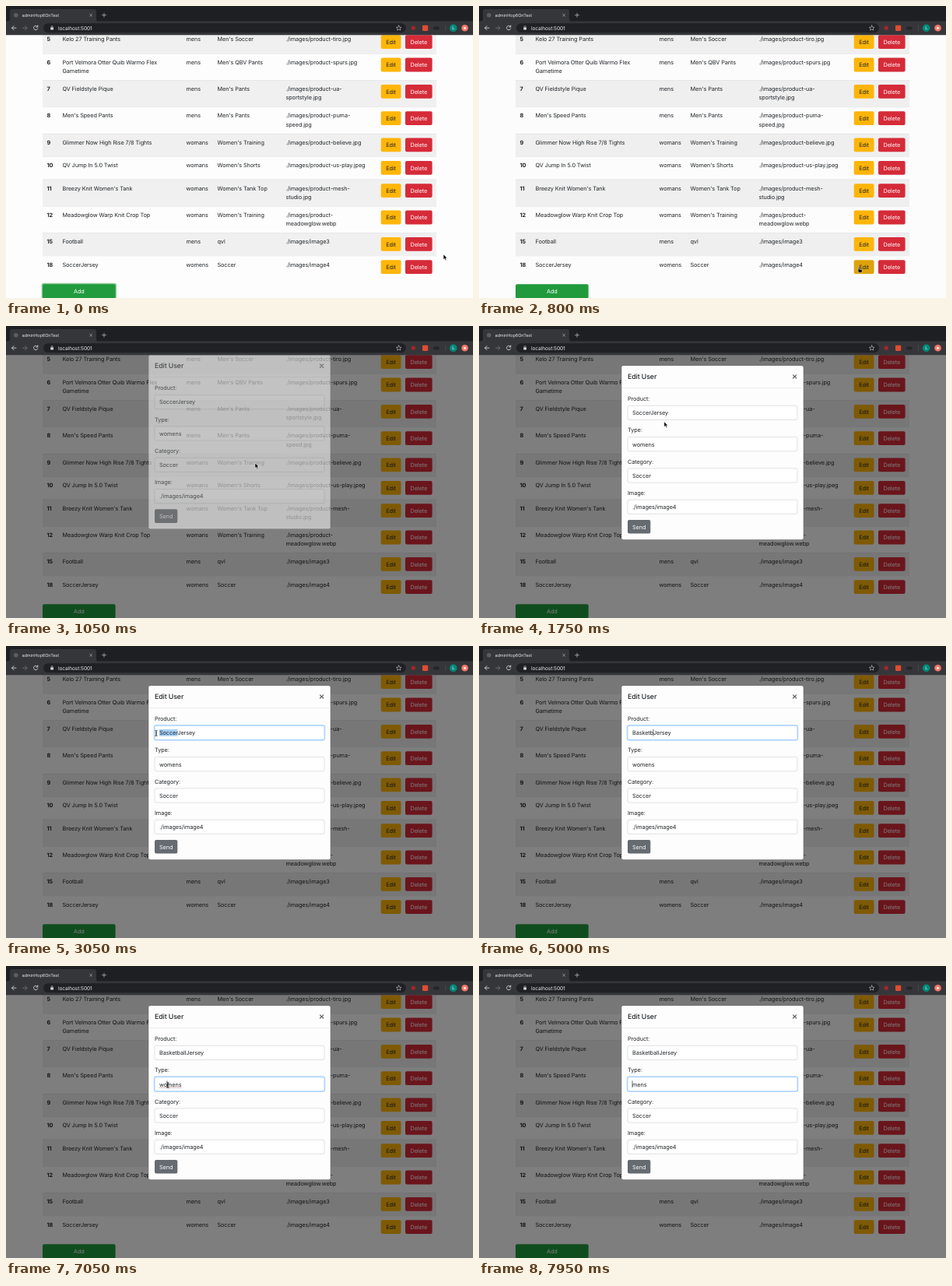
Write an HTML page that moves like this. It is 600 px wide and 375 px high and loops after 8 s.

```html
<!DOCTYPE html>
<html lang="en">
<head>
<meta charset="utf-8">
<title>Product admin</title>
<style>
  html, body { margin: 0; width: 100%; height: 100%; overflow: hidden; background: #fdfdfd; }
  svg { display: block; width: 100vw; height: 100vh; }
  text { font: 7.3px Inter, Roboto, sans-serif; letter-spacing: -.1px; fill: #212529; white-space: pre; text-rendering: geometricPrecision; }
</style>
</head>
<body>
<svg id="stage" viewBox="0 0 600 375"></svg>
<script type="module">
const LOOP = 8000;
const stage = document.getElementById('stage');

function add(parent, tag, attrs = {}, content) {
  const node = document.createElementNS('http://www.w3.org/2000/svg', tag);
  set(node, attrs);
  if (content !== undefined) node.textContent = content;
  parent.append(node);
  return node;
}
function set(node, attrs) {
  for (const key in attrs) node.setAttribute(key, attrs[key]);
}
const group = parent => add(parent, 'g');
const rect = (parent, x, y, width, height, fill, rx = 0, more = {}) =>
  add(parent, 'rect', { x, y, width, height, fill, rx, ...more });
const circle = (parent, cx, cy, r, fill) => add(parent, 'circle', { cx, cy, r, fill });
const line = (parent, d, stroke, width = 1) =>
  add(parent, 'path', { d, stroke, 'stroke-width': width, fill: 'none', 'stroke-linecap': 'round', 'stroke-linejoin': 'round' });
const label = (parent, x, y, content, style = '') => add(parent, 'text', { x, y, style }, content);
const show = (node, visible) => { node.style.display = visible ? '' : 'none'; };
const clamp = (v, lo = 0, hi = 1) => Math.min(hi, Math.max(lo, v));

function button(parent, x, y, width, height, fill, caption, color = '#fff') {
  const box = rect(parent, x, y, width, height, fill, 2);
  label(parent, x + width / 2, y + height / 2 + 2.7, caption, `fill:${color};text-anchor:middle`);
  return box;
}

// Page with the product table
const rows = [
  ['5', 'Kelo 27 Training Pants', 'mens', "Men's Soccer", './images/product-tiro.jpg'],
  ['6', 'Port Velmora Otter Quib Warmo Flex|Gametime', 'mens', "Men's QBV Pants", './images/product-spurs.jpg'],
  ['7', 'QV Fieldstyle Pique', 'mens', "Men's Pants", './images/product-ua-|sportstyle.jpg'],
  ['8', "Men's Speed Pants", 'mens', "Men's Pants", './images/product-puma-|speed.jpg'],
  ['9', 'Glimmer Now High Rise 7/8 Tights', 'womans', "Women's Training", './images/product-believe.jpg'],
  ['10', 'QV Jump In 5.0 Twist', 'womans', "Women's Shorts", './images/product-us-play.jpeg'],
  ['11', "Breezy Knit Women's Tank", 'womans', "Women's Tank Top", './images/product-mesh-|studio.jpg'],
  ['12', 'Meadowglow Warp Knit Crop Top', 'womans', "Women's Training", './images/product-|meadowglow.webp'],
  ['15', 'Football', 'mens', 'qvl', './images/image3'],
  ['18', 'SoccerJersey', 'womens', 'Soccer', './images/image4']
];
const columns = [52.5, 72.5, 231.5, 271.5, 359.5];
const page = group(stage);
rect(page, 0, 37, 600, 338, '#fdfdfd');
let rowY = 31.6, lastEdit;
rows.forEach((row, i) => {
  const height = row.some(cell => cell.includes('|')) ? 34.3 : 29.4;
  rect(page, 47, rowY, 506, height, i % 2 ? '#fdfdfd' : '#f0f0f0');
  rect(page, 47, rowY, 506, .5, '#d9dde1');
  row.forEach((cell, c) => cell.split('|').forEach((part, n) =>
    label(page, columns[c], rowY + 13.8 + n * 11.25, part, c ? '' : 'font-weight:700')));
  lastEdit = button(page, 481.7, rowY + 5.6, 25.8, 17.8, '#ffb609', 'Edit', '#212529');
  button(page, 513, rowY + 5.6, 34.6, 17.8, '#d62b39', 'Delete');
  rowY += height;
});
const addRing = rect(page, 45.6, 355.7, 96.4, 22, '#8fcd9d', 3);
button(page, 47, 357.2, 93.6, 18.2, '#219b3d', 'Add');

const backdrop = rect(stage, 0, 37, 600, 338, '#000');

// Edit dialog
const modal = group(stage);
rect(modal, 183.2, 51, 233.6, 223.2, '#fdfdfd', 2.2, { stroke: '#000', 'stroke-opacity': .2, 'stroke-width': .5 });
label(modal, 191, 68.2, 'Edit User', 'font-size:8.8px;font-weight:500');
line(modal, 'M403.5 62.8l4.2 4.2m0-4.2l-4.2 4.2', '#666', 1.2);
rect(modal, 183.5, 79.2, 233, .5, '#dcdfe3');
const fields = ['Product:', 'Type:', 'Category:', 'Image:'].map((name, i) => {
  const y = 102.3 + i * 40.3;
  label(modal, 191, y - 6.2, name);
  const ring = rect(modal, 189.7, y - 1.3, 220.6, 20.8, '#bfdeff', 3);
  const box = rect(modal, 191, y, 218, 18.2, '#fff', 2, { 'stroke-width': .6 });
  const selection = rect(modal, 197, y + 4.7, 0, 8.8, '#a6d0f8');
  const text = label(modal, 197, y + 11.9, rows[9][i + 1]);
  return { y, ring, box, selection, text };
});
const squiggle = line(modal, 'M197.5 156.2h27.5', '#b0605f', .7);
set(squiggle, { 'stroke-dasharray': '.3 1.2' });
const caret = rect(modal, 0, 0, .6, 8.8, '#111');
button(modal, 191, 249, 29.3, 17.6, '#656b71', 'Send');

// Browser frame
const browser = group(stage);
rect(browser, 0, 0, 600, 20, '#1e1f22');
add(browser, 'path', { d: 'M2 20q3 0 3-3V7q0-3 3-3h105q3 0 3 3v10q0 3 3 3z', fill: '#35363a' });
rect(browser, 0, 19.5, 600, 17.8, '#35363a');
circle(browser, 12.8, 11.7, 2.8, '#5b5d61');
label(browser, 20.5, 13.7, 'adminHop6OnTest', 'font-size:5.6px;fill:#e3e4e6');
line(browser, 'M107.6 10.2l3 3m0-3l-3 3', '#c4c6c9', .6);
line(browser, 'M123.5 11.7h5m-2.5-2.5v5', '#c4c6c9', .7);
line(browser, 'M13 28.2h-5.5m2.6-2.6l-2.6 2.6l2.6 2.6', '#e3e5e8', .8);
line(browser, 'M21.5 28.2h5.5m-2.6-2.6l2.6 2.6l-2.6 2.6', '#75777b', .8);
line(browser, 'M40.4 26.4a2.7 2.7 0 1 0 .4 2.6m0-4v2h-2', '#e3e5e8', .8);
rect(browser, 48, 22.3, 466, 12, '#202124', 6);
rect(browser, 57.2, 27.5, 3.8, 3.1, '#d5d7da', .4);
line(browser, 'M58 27.5v-.8a1.1 1.1 0 0 1 2.2 0v.8', '#d5d7da', .6);
label(browser, 67, 30.5, 'localhost:5001', 'font-size:6.6px;fill:#e8eaed');
line(browser, 'M504.7 25l1 2.2 2.3.2-1.8 1.5.6 2.3-2.1-1.2-2.1 1.2.6-2.3-1.8-1.5 2.3-.2z', '#c9cbce', .6);
circle(browser, 523.3, 28.3, 2.7, '#a3262b');
rect(browser, 535, 24.7, 7.2, 7.2, '#e14b34', 1);
rect(browser, 549.5, 26.5, 7, 4, '#242529', 1);
rect(browser, 564, 24.2, .5, 8, '#55575b');
circle(browser, 574.7, 28.3, 4.8, '#00897b');
label(browser, 574.7, 30.4, 'L', 'font-size:5.6px;fill:#fff;text-anchor:middle');
circle(browser, 589.5, 28.3, 4.3, '#ef7768');
circle(browser, 589.5, 28.3, 1.6, '#fbe3de');

// Mouse pointers
const pointers = {
  arrow: add(stage, 'path', { d: 'M0 0v6.6l1.6-1.4 1.1 2.5 1.2-.5-1.1-2.4h2.1z', fill: '#000', stroke: '#fff', 'stroke-width': .5 }),
  hand: add(stage, 'path', { d: 'M-.7.4q.7-.8 1.4 0v2.6l3 .7q.7.2.6 1l-.5 2.6h-3.4l-2.2-2.7q.1-.9 1.1-.2z', fill: '#000', stroke: '#fff', 'stroke-width': .5 }),
  beam: line(stage, 'M-1.3-3.6q1.3 0 1.3 1v5.2q0 1-1.3 1m2.6-7.2q-1.3 0-1.3 1v5.2q0 1 1.3 1', '#111', .7)
};
const route = [ // time, x, y
  [0, 562, 319], [700, 488, 335], [900, 488, 335], [1050, 320, 176], [2000, 221, 112],
  [2450, 221, 112], [2950, 193, 112], [6000, 193, 112], [6750, 208, 153], [LOOP, 208, 153]
];
function pointerAt(t) {
  const i = route.findIndex(key => t < key[0]);
  const [t0, x0, y0] = route[i - 1], [t1, x1, y1] = route[i];
  const p = (t - t0) / (t1 - t0), e = p * p * (3 - 2 * p);
  return { x: x0 + (x1 - x0) * e, y: y0 + (y1 - y0) * e };
}

const HIT_EDIT = 780, FADE = 800, OPEN = 970, FOCUS_PRODUCT = 2150;
const TYPING = 3600, KEY_GAP = 230, FOCUS_TYPE = 6850, ERASE = [7400, 7650];
const WORD = 'Basketball';

function drawDialog(t, mouse) {
  const p = clamp((t - OPEN) / 300);
  set(modal, {
    opacity: clamp((t - OPEN) / 150),
    transform: `translate(0 ${-23.4 * (1 - p) ** 1.7})`
  });

  const typed = clamp(Math.floor((t - TYPING) / KEY_GAP) + 1, 0, WORD.length);
  const erased = ERASE.filter(time => t >= time).length;
  fields[0].text.textContent = (typed ? WORD.slice(0, typed) : 'Soccer') + 'Jersey';
  fields[1].text.textContent = 'womens'.slice(0, 2 - erased) + 'mens';

  const focus = t >= FOCUS_TYPE ? 1 : t >= FOCUS_PRODUCT ? 0 : -1;
  fields.forEach((field, i) => {
    show(field.ring, i === focus);
    set(field.box, { stroke: i === focus ? '#80bdff' : '#c9ced3' });
  });

  const widthTo = (field, count) => count ? field.text.getSubStringLength(0, count) : 0;
  const from = Math.round(clamp((mouse.x - 197) / 4, 0, 6));
  const selecting = focus === 0 && !typed && from < 6;
  const start = widthTo(fields[0], from);
  set(fields[0].selection, { x: 197 + start, width: selecting ? widthTo(fields[0], 6) - start : 0 });

  const caretActive = focus >= 0 && !selecting;
  if (caretActive) {
    const field = fields[focus];
    const index = focus ? 2 - erased : typed || 6;
    const lastAction = focus ? (erased ? ERASE[erased - 1] : FOCUS_TYPE)
      : typed ? TYPING + (typed - 1) * KEY_GAP : FOCUS_PRODUCT;
    set(caret, { x: 197 + widthTo(field, index) - .3, y: field.y + 4.7 });
    show(caret, (t - lastAction) % 1000 < 500);
  } else {
    show(caret, false);
  }
  show(squiggle, focus === 1 && !erased);
}

function render(t) {
  const mouse = pointerAt(t);
  const overEdit = t < OPEN && mouse.x < 507 && mouse.y > 326;
  set(lastEdit, { fill: overEdit ? '#e0a30a' : '#ffb609' });
  show(addRing, t < HIT_EDIT);
  set(backdrop, { opacity: .5 * clamp((t - FADE) / 150) });
  drawDialog(t, mouse);

  const inField = t > OPEN && fields.some(f => mouse.x > 191 && mouse.x < 409 && mouse.y > f.y && mouse.y < f.y + 18.2);
  const shape = overEdit ? 'hand' : inField && t > 1200 ? 'beam' : 'arrow';
  const hidden = (t >= TYPING && t < 6000) || t >= ERASE[0];
  for (const name in pointers) {
    show(pointers[name], name === shape && !hidden);
    set(pointers[name], { transform: `translate(${mouse.x} ${mouse.y})` });
  }
}

const began = performance.now();
function tick() {
  render((performance.now() - began) % LOOP);
  requestAnimationFrame(tick);
}
tick();
</script>
</body>
</html>
```
